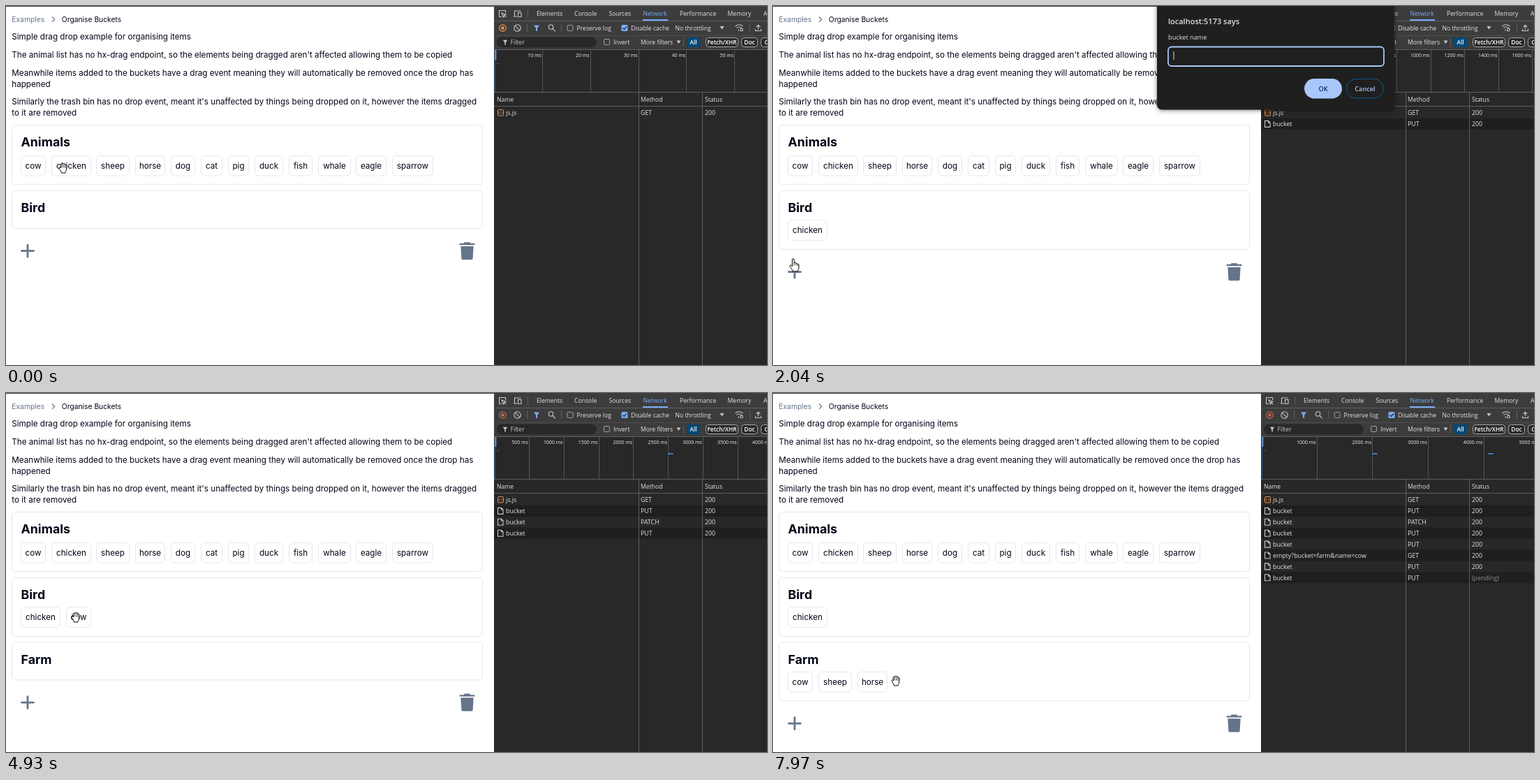
Animation, 1090 px wide and 514 px high, one loop 8000 ms. Source, as an HTML page:

```html
<!DOCTYPE html>
<html lang="en">
<head>
<meta charset="utf-8">
<title>Organise Buckets</title>
<style>
html, body { margin: 0; width: 100%; height: 100%; overflow: hidden; background: #fff; }
svg { display: block; }
text { white-space: pre; }
.page { font: 11.66px Inter, sans-serif; fill: #020617; }
.page .crumb { font-size: 10.3px; }
.page .head { font-size: 17.8px; font-weight: 700; }
.tools { font: 8.65px "Open Sans", "Noto Sans", sans-serif; fill: #e3e3e3; }
.tools .row { font-size: 8.85px; }
.tools .tick { font-size: 7px; fill: #f0f0f0; }
.tools .pill { font-weight: 600; fill: #fff; font-size: 8.4px; }
.icon { fill: none; stroke: #c7c7c7; stroke-width: 1.1; }
.cursor { fill: #fff; stroke: #000; stroke-width: 1; stroke-linejoin: round; }
.mid { text-anchor: middle; }
.end { text-anchor: end; }
</style>
</head>
<body>
<svg id="stage" width="1090" height="514" viewBox="0 0 1090 514"></svg>
<script>
const LOOP = 8000, STEP = 78.1;
const SLATE = '#64748b', BLUE = '#7cacf8', LINE = '#5e5e5e';
const EMPTY = 54, FILLED = 84;

const escape = s => s.replace(/&/g, '&amp;').replace(/</g, '&lt;');
const text = (x, y, s, cls = '', more = '') =>
  `<text x="${x}" y="${y}" class="${cls}" ${more}>${escape(s)}</text>`;
const rect = (x, y, w, h, fill, more = '') =>
  `<rect x="${x}" y="${y}" width="${w}" height="${h}" fill="${fill}" ${more}/>`;
const path = (d, more = 'class="icon"') => `<path d="${d}" ${more}/>`;
const vline = (x, y1, y2, color = LINE) => rect(x, y1, 1, y2 - y1, color);
const group = (x, y, body, more = '') => `<g transform="translate(${x} ${y})" ${more}>${body}</g>`;

// name: [x, width] in the animal list
const ANIMALS = {
  cow: [21, 36], chicken: [65, 57], sheep: [129, 48], horse: [185, 43],
  dog: [236, 35], cat: [279, 31], pig: [318, 30], duck: [356, 41],
  fish: [405, 34], whale: [447, 47], eagle: [501, 44], sparrow: [553, 59]
};

function chip(name, x, y, more = '') {
  const w = ANIMALS[name][1];
  return group(x, y,
    rect(.5, .5, w - 1, 28.5, '#fff', 'rx="5" stroke="#e5e7eb"') +
    text(w / 2, 19, name, 'mid'), more);
}

function card(title, y, h, chips = '') {
  return rect(8.5, y + .5, 674, h, '#fff', 'rx="5" stroke="#e5e7eb"') +
    text(21.5, y + 31.3, title, 'head') + chips;
}

function bucket(title, y, names) {
  let x = 21;
  const chips = names.map(n => {
    const c = chip(n, x, y + 42.4);
    x += ANIMALS[n][1] + 8;
    return c;
  });
  return card(title, y, names.length ? FILLED : EMPTY, chips.join(''));
}

function pageBase() {
  const lines = [
    [48.4, 'Simple drag drop example for organising items'],
    [74.2, "The animal list has no hx-drag endpoint, so the elements being dragged aren't affected allowing them to be copied"],
    [100.2, 'Meanwhile items added to the buckets have a drag event meaning they will automatically be removed once the drop has'],
    [116.2, 'happened'],
    [141.2, "Similarly the trash bin has no drop event, meant it's unaffected by things being dropped on it, however the items dragged"],
    [157.2, 'to it are removed']
  ];
  const chips = Object.entries(ANIMALS).map(([n, [x]]) => chip(n, x, 214)).join('');
  return `<g class="page">` + rect(0, 0, 699, 514, '#fff') +
    text(8.3, 22.8, 'Examples', 'crumb', `fill="${SLATE}"`) +
    path('M66 15.5l3.6 3.7-3.6 3.7', `fill="none" stroke="${SLATE}" stroke-width="1.2"`) +
    text(79.8, 22.8, 'Organise Buckets', 'crumb') +
    lines.map(([y, s]) => text(8.3, y, s)).join('') +
    card('Animals', 170, 85, chips) + '</g>';
}

const checkbox = (x, y) => rect(x - 4, y - 4, 8, 8, 'none', 'rx="1.5" stroke="#a0a0a0"');
const arrowDown = (x, y) => path(`M${x - 3} ${y - 2}h6l-3 4.5z`, 'fill="#c7c7c7"');
const funnel = (x, y, color, s = 1) =>
  group(x, y, path('M-4-4H4L1 .3V4.3H-1V.3Z', `fill="${color}" transform="scale(${s})"`));

function toolsBase() {
  const tabs = [[760, 'Elements'], [814, 'Console'], [863.5, 'Sources'], [912.5, 'Network'],
    [965, 'Performance'], [1033.5, 'Memory'], [1085, 'Application']];
  const pill = (x, w, s) => rect(x + .5, 45.5, w, 13, '#282828', 'rx="4" stroke="#a8a8a8"') +
    text(x + w / 2 + .5, 55.2, s, 'mid pill');
  return `<g class="tools">` +
    rect(699, 0, 391, 514, '#282828') + rect(699, 0, 391, 62, '#3c3c3c') +
    rect(699, 21, 391, 1, LINE) + rect(699, 42, 391, 1, '#4c4c4c') + rect(699, 62, 391, 1, LINE) +
    // tab bar
    path('M710 15.5H706.5V6.5H715.5V10M710 10l6 2.3-2.6 1-1 2.6zM713.5 13.5l2.5 2.5') +
    path('M728.5 14.5V7h9M727 15h5M733.5 9.5h4.5v6h-4.5z') +
    vline(747, 5, 17) +
    tabs.map(([x, s]) => text(x, 14.2, s, '', s === 'Network' ? `fill="${BLUE}"` : '')).join('') +
    rect(912, 19, 36, 2, BLUE) +
    // action bar
    '<circle cx="732.5" cy="31.5" r="4.7" class="icon"/>' + path('M729.2 28.2l6.6 6.6') +
    vline(746, 25, 37) + funnel(760, 31.5, BLUE) +
    '<circle cx="780.5" cy="30" r="3.2" class="icon"/>' + path('M783 32.5l3.8 3.8') +
    vline(795, 25, 37) + checkbox(808, 31.5) + text(817.5, 34.5, 'Preserve log') +
    rect(881.5, 27, 9, 9, BLUE, 'rx="1.5"') +
    path('M883.5 31.5l2 2 3.5-4', 'fill="none" stroke="#20304a" stroke-width="1.3"') +
    text(895, 34.5, 'Disable cache') + text(958.5, 34.5, 'No throttling') + arrowDown(1025.5, 31) +
    path('M1044.5 29q5.5-4.5 11 0M1046.5 31.5q3.5-3 7 0M1048.5 34l1.5 1.5') +
    '<circle cx="1053.5" cy="34" r="1.9" class="icon"/>' +
    vline(1065, 25, 37) + path('M1077.5 33.5V27.5M1074.8 30l2.7-2.7 2.7 2.7M1073.5 33v2.5h8V33') +
    // filter bar
    rect(703, 44.5, 143, 15, '#282828', 'rx="7.5"') + funnel(715, 52, '#c7c7c7', .8) +
    text(722.5, 55.2, 'Filter', '', 'fill="#c7c7c7"') +
    checkbox(860.5, 51.5) + text(870, 55.2, 'Invert') +
    text(909, 55.2, 'More filters') + arrowDown(963.5, 51.5) + vline(970, 46, 58) +
    rect(975, 45, 19, 14, '#004a77', 'rx="4"') + text(984.5, 55.2, 'All', 'mid pill') +
    pill(1002, 46, 'Fetch/XHR') + pill(1053, 23, 'Doc') + pill(1081, 24, 'CSS') +
    // table header
    rect(699, 123, 391, 1, LINE) + rect(699, 143, 391, 1, LINE) +
    text(703, 137.2, 'Name') + text(909, 137.2, 'Method') + text(1001, 137.2, 'Status') + '</g>';
}

// [from, line spacing, ms per line, request marks]
const SCALES = [
  [0, 68.8, 10, []], [9, 48.5, 200, []], [42, 62.1, 500, [1010]],
  [62, 49.8, 500, [948.5]], [92, 79.6, 1000, [858.5]], [101, 79.6, 1000, [858.5, 1024.5]]
];

function timeline(k) {
  const [, gap, unit, marks] = SCALES.filter(s => s[0] <= k).pop();
  let out = '';
  for (let i = 1; gap * i < 400; i++) {
    const x = 699.6 + gap * i;
    out += vline(Math.round(x - .5), 63, 123, '#555') +
      text(x - 1.5, 72.8, i * unit + ' ms', 'tick end');
  }
  return out + vline(700, 63, 123, '#1a5f9e') + rect(700, 63, 2.5, 14, BLUE, 'opacity=".7"') +
    rect(702, 82, 5, 1, '#35506f') +
    marks.map(x => rect(x, 86, 7, 2, '#3b82d0')).join('');
}

// [from, name, method]
const REQUESTS = [
  [-9, 'js.js', 'GET'], [8, 'bucket', 'PUT'], [42, 'bucket', 'PATCH'], [61, 'bucket', 'PUT'],
  [71, 'bucket', 'PUT'], [71, 'empty?bucket=farm&name=cow', 'GET'],
  [91, 'bucket', 'PUT'], [101, 'bucket', 'PUT']
];

function fileIcon(y, script) {
  return script
    ? rect(704.5, y - 4.5, 8, 8.5, 'none', 'rx="1" stroke="#e8914f"') +
      path(`M707.5 ${y - 2}l-1.5 1.7 1.5 1.7M709.5 ${y - 2}l1.5 1.7-1.5 1.7`,
        'fill="none" stroke="#e8914f" stroke-width=".9"')
    : path(`M704.5 ${y - 4.5}h5l2.5 2.5v6.5h-7.5zM709.5 ${y - 4.5}v2.5h2.5`);
}

function requests(k) {
  return REQUESTS.filter(r => r[0] <= k).map(([from, name, method], i) => {
    const y = 153 + i * 15.9, base = y + 3.3, waiting = k < from + 2;
    return (i % 2 ? rect(699, y - 8, 391, 16, '#1f1f1f') : '') + fileIcon(y, !i) +
      text(716, base, name, 'row') + text(909, base, method, 'row') +
      text(1001, base, waiting ? '(pending)' : '200', 'row', waiting ? 'fill="#8f8f8f"' : '');
  }).join('') + vline(906, 124, 514) + vline(997, 124, 514);
}

function buckets(k) {
  const bird = [], farm = [];
  if (k >= 8) bird.push('chicken');
  if (k >= 61 && k < 71) bird.push('cow');
  if (k >= 71) farm.push('cow');
  if (k >= 91) farm.push('sheep');
  if (k >= 101) farm.push('horse');
  const hasFarm = k >= 42;
  let end = 264 + (bird.length ? FILLED : EMPTY);
  if (hasFarm) end = 356.4 + (farm.length ? FILLED : EMPTY);
  const trash = 'M-10.5-9.8q0-.7.7-.7h5l1-1.5h7.600l1 1.5h5q.7 0 .7.7v1.6h-21z' +
    'M-8.8-6.5h17.6l-1 16.8q-.1 1.7-1.8 1.7h-12q-1.7 0-1.8-1.7z';
  return bucket('Bird', 264, bird) + (hasFarm ? bucket('Farm', 356.4, farm) : '') +
    group(31, end + 32.7, path('M-8.5 0h17M0-8.5v17',
      `stroke="${SLATE}" stroke-width="2.8" stroke-linecap="round"`)) +
    group(660.5, end + 32.7, path(trash, `fill="${SLATE}" transform="scale(1.04)"`));
}

// [from, typed text, caret x]
const TYPING = [[26, '', 574], [29, 'f', 577], [31, 'fa', 582], [32, 'far', 585.5], [35, 'farm', 593]];

function prompt(k) {
  if (k < 26 || k >= 41) return '';
  const [, typed, caret] = TYPING.filter(s => s[0] <= k).pop();
  return rect(550, -10, 340, 158.5, '#1f1f1f',
      'rx="7" style="filter:drop-shadow(0 1px 3px rgba(0,0,0,.5))"') +
    text(566, 26.3, 'localhost:5173 says', '', 'font-size="11" font-weight="600"') +
    text(566, 48.3, 'bucket name', '', 'font-size="9.2"') +
    rect(566, 58.5, 309, 27.5, '#1f1f1f', 'rx="5" stroke="#a8c7fa" stroke-width="1.8"') +
    text(573.5, 75, typed, '', 'font-size="9.2"') + vline(caret - .5, 65, 77, '#e3e3e3') +
    rect(761, 104, 54, 28.5, '#a8c7fa', 'rx="14.2"') +
    text(788, 121.7, 'OK', 'mid', 'font-size="9.2" font-weight="600" fill="#062e6f"') +
    rect(821.5, 104.5, 53, 27.5, 'none', 'rx="13.7" stroke="#0b5c94"') +
    text(848, 121.7, 'Cancel', 'mid', 'font-size="9.2" font-weight="600" fill="#a8c7fa"');
}

const ARROW = 'M0 0V13L3 10.2 5 15 7 14.2 5 9.5H9Z';
const CURSORS = {
  arrow: path(ARROW, ''),
  copy: path(ARROW, '') + path('M4.5 14v3.5h2', 'fill="none" stroke-dasharray="1.5 1"') +
    rect(7, 13.5, 6, 6, '#fff') + path('M8.5 16.5h3M10 15v3', ''),
  hand: path('M-5.5 1C-7-1-4.5-2-3.5 0L-4-4.5C-4-6-2.3-6-2-4.7L-1.5-6C-1-7.3.6-7 .7-5.8' +
    'C1.2-7 3-6.6 3-5.2L3.1-4C3.8-5 5.3-4.3 5.2-3L4.6 2C4.5 4 3.2 4.5 3 7H-2.5' +
    'C-2.8 4.8-4.4 3.5-5.5 1Z', '') + path('M-1.9-4.5V-.5M.7-5.5V-.5M3-4.5V0', 'stroke-width=".8"'),
  point: path('M-1.5 1C-1.5-.6 1.2-.6 1.2 1V6C2 5 4 5.3 4 6.6 5 6 6.3 6.5 6.3 7.8' +
    'C7.2 7.4 8 8 8 9V13C8 15 6.5 15.5 6.5 18H-.5C-.8 16-3 14-5 10.5-5.6 9-3.6 8.3-2.6 9.6' +
    'L-1.5 11Z', '') + path('M1.2 6V9.5M4 6.6V9.5M6.3 7.8V10', 'stroke-width=".8"')
};

// [step, x, y, cursor]
const TRACK = [
  [0, 82, 232, 'hand'], [2, 82, 236, 'copy'], [5, 74, 292, 'copy'], [7, 72, 312, 'copy'],
  [8, 72, 314, 'hand'], [11, 90, 300, 'arrow'], [14, 142, 250, 'arrow'], [15, 158, 240, 'hand'],
  [16, 150, 238, 'hand'], [18, 130, 256, 'arrow'], [22, 30, 382, 'point'], [24, 29, 372, 'point'],
  [26, 29, 362, 'point'], [41, 29, 362, 'arrow'], [43, 24, 352, 'arrow'], [47, 24, 352, 'arrow'],
  [51, 62, 250, 'arrow'], [52, 47, 236, 'hand'], [54, 47, 236, 'hand'], [55, 62, 246, 'copy'],
  [60, 98, 318, 'copy'], [61, 100, 321, 'hand'], [65, 100, 321, 'hand'], [66, 98, 328, 'copy'],
  [70, 62, 402, 'copy'], [71, 56, 404, 'hand'], [72, 54, 385, 'arrow'], [74, 59, 316, 'hand'],
  [75, 84, 276, 'arrow'], [78, 125, 250, 'arrow'], [80, 160, 240, 'hand'], [82, 184, 236, 'hand'],
  [85, 162, 228, 'hand'], [86, 162, 228, 'hand'], [87, 150, 252, 'copy'], [89, 82, 416, 'copy'],
  [90, 79, 426, 'copy'], [91, 80, 422, 'hand'], [92, 108, 374, 'arrow'], [95, 207, 222, 'hand'],
  [96, 207, 222, 'hand'], [97, 204, 240, 'copy'], [100, 174, 412, 'copy'], [101, 176, 413, 'hand'],
  [102, 176, 412, 'hand']
];
// [press, release, dragged chip, offset x, offset y]
const PRESSES = [
  [1, 8, 'chicken', 17, 18], [24, 26], [54, 61, 'cow', 26, 22], [65, 71, 'cow', 14, 15],
  [86, 91, 'sheep', 33, 14], [96, 101, 'horse', 22, 8]
];

function pointer(k) {
  const i = TRACK.findLastIndex(s => s[0] <= k);
  const [k0, x0, y0, kind] = TRACK[i];
  const [k1, x1, y1] = TRACK[i + 1] || TRACK[i];
  const f = k1 > k0 ? (k - k0) / (k1 - k0) : 0;
  const x = x0 + (x1 - x0) * f, y = y0 + (y1 - y0) * f;
  const press = PRESSES.find(p => p[0] <= k && k < p[1]);
  let out = '';
  if (kind === 'copy') {
    const [, , name, dx, dy] = press;
    out += `<g class="page">${chip(name, x - dx, y - dy, 'opacity=".6"')}</g>`;
  }
  out += group(x, y, CURSORS[kind], 'class="cursor"');
  if (press) {
    const fresh = k === press[0];
    out += `<circle cx="${x - .5}" cy="${y - 1}" r="${fresh ? 8 : 9}" fill="#fff01e" ` +
      `opacity="${fresh ? .6 : .75}"/>`;
  }
  return out;
}

function record(k) {
  const color = k < 41 ? '#ee9252' : '#c46a50';
  return `<circle cx="711.5" cy="31.5" r="4.7" fill="none" stroke="${color}" stroke-width="1.2"/>` +
    rect(709.5, 29.5, 4, 4, color);
}

const stage = document.getElementById('stage');
stage.innerHTML = pageBase() + toolsBase() + '<g id="live"></g>';
const live = document.getElementById('live');
let shown = -1;

function draw() {
  const k = Math.floor((performance.now() % LOOP + 8) / STEP);
  if (k !== shown) {
    shown = k;
    live.innerHTML = `<g class="page">${buckets(k)}</g>` +
      `<g class="tools">${timeline(k)}${requests(k)}${record(k)}</g>` +
      rect(0, 0, 1090, 1, '#3c3c3c') +
      `<g class="tools">${prompt(k)}</g>` + pointer(k);
  }
  requestAnimationFrame(draw);
}
draw();
</script>
</body>
</html>
```
